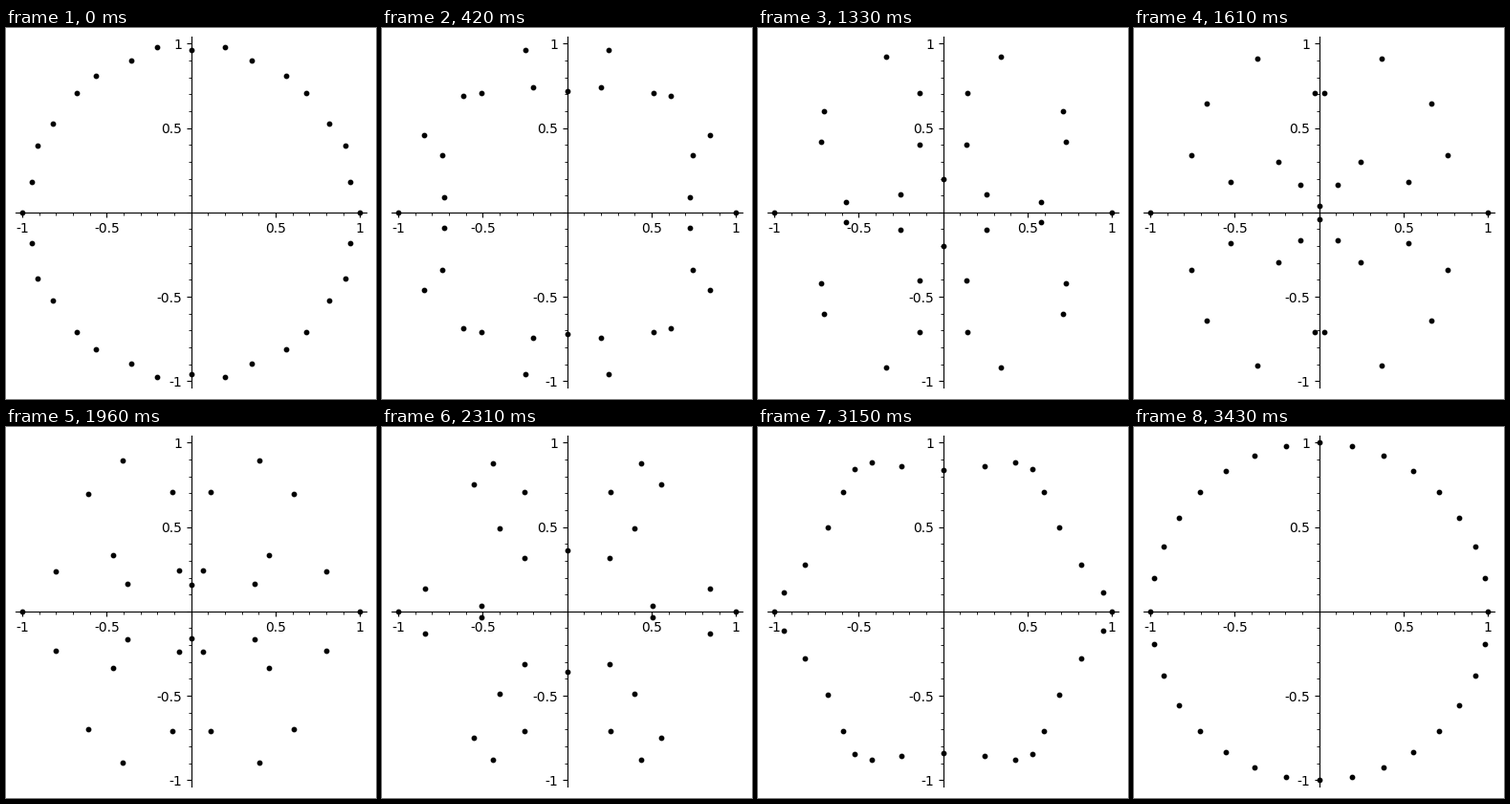
Write a matplotlib script that moves like this. It is 387 px wide and 388 px high and loops after 3500 ms.

```python
import numpy as np
import matplotlib.pyplot as plt
from matplotlib.animation import FuncAnimation

WIDTH, HEIGHT, DPI = 387, 388, 100
FRAMES, INTERVAL = 50, 70
ORDER, POWER = 32, 19

# Pixel centre (from bottom left), pixels per unit and half-range of the axes
CENTER_X, CENTER_Y, SCALE, LIMIT = 193.7, 195.18, 176.5, 1.04

plt.rcParams["font.family"] = "DejaVu Sans"
plt.rcParams["font.size"] = 10

# Each root of unity travels in a straight line to its power
roots = np.exp(2j * np.pi * np.arange(ORDER) / ORDER)
goals = roots[np.arange(ORDER) * POWER % ORDER]


def positions(frame):
    s = (frame + 1) / FRAMES
    z = (1 - s) * roots + s * goals
    return np.column_stack([z.real, z.imag])


fig = plt.figure(figsize=(WIDTH / DPI, HEIGHT / DPI), dpi=DPI, facecolor="white")
half = SCALE * LIMIT
ax = fig.add_axes([(CENTER_X - half) / WIDTH, (CENTER_Y - half) / HEIGHT,
                   2 * half / WIDTH, 2 * half / HEIGHT])
dots = ax.scatter(*positions(0).T, s=10, color="black", zorder=5)

ax.set(xlim=(-LIMIT, LIMIT), ylim=(-LIMIT, LIMIT))
for side in ("top", "right"):
    ax.spines[side].set_visible(False)
for side in ("left", "bottom"):
    ax.spines[side].set_position("zero")

major = [-1, -0.5, 0, 0.5, 1]
labels = [f"{v:g}" if v else "" for v in major]
minor = [k / 10 for k in range(-10, 11) if k % 5]
for axis in (ax.xaxis, ax.yaxis):
    axis.set_ticks(major, labels)
    axis.set_ticks(minor, minor=True)


def update(frame):
    dots.set_offsets(positions(frame))
    return (dots,)


anim = FuncAnimation(fig, update, frames=FRAMES, interval=INTERVAL, repeat=True)
plt.show()
```
